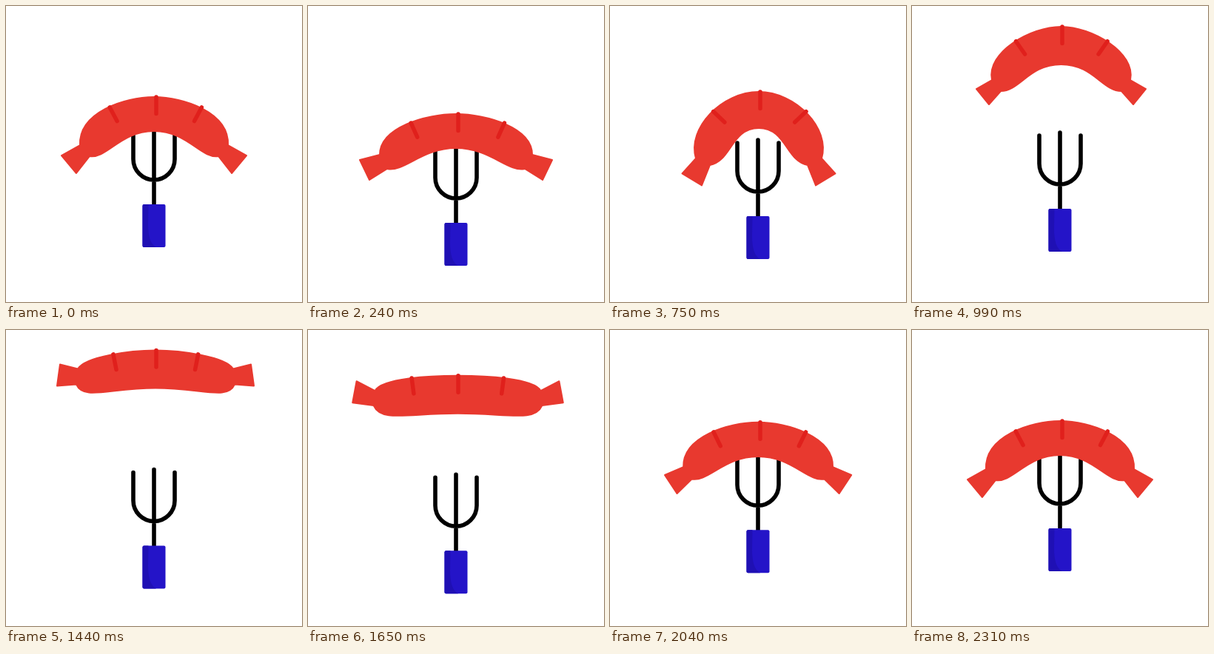
Recreate the animation shown at these times as an HTML page. Size 400x400 px, loop 5.34 s.

```html
<!DOCTYPE html>
<html lang="en">
<head>
<meta charset="utf-8">
<title>Sausage toss</title>
<style>
html, body { margin: 0; width: 100%; height: 100%; overflow: hidden; background: #fff; }
svg { display: block; width: 100%; height: 100%; }
</style>
</head>
<body>
<svg viewBox="0 0 400 400">
  <g id="fork">
    <path d="M172 169V207a28 28 0 0 0 56 0V169M200 165V270" fill="none" stroke="#000" stroke-width="5.6" stroke-linecap="round"/>
    <rect x="184.5" y="268" width="31" height="58" rx="2" fill="#2414c8"/>
    <path d="M192.500 268H186.500a2 2 0 0 0-2 2V324a2 2 0 0 0 2 2H203C195 322 192 310 192 295Z" fill="#1f10b4"/>
  </g>
  <path id="body" fill="#e8392f" stroke="#e8392f" stroke-width="2" stroke-linejoin="round"/>
  <path id="cuts" fill="none" stroke="#e0201c" stroke-width="5.5" stroke-linecap="round"/>
</svg>
<script>
const LOOP = 5340, STEP = 30;
const $ = id => document.getElementById(id);
const mix = (a, b, k) => a.map((v, i) => v + (b[i] - v) * k);

// Right half of the sausage, relative to its top centre:
// upper curve (c1x, c2, end), tab corners, lower curve (start, d1, d2x, height)
const rest   = [40, 102, 20.5, 100, 65, 125, 79, 105, 103, 87, 80, 64, 84, 45, 46];
const loose  = [41, 103, 18, 103, 55, 130, 62, 117, 89, 93, 74, 70, 79, 46, 46];
const curled = [50, 97, 49, 85, 90, 103.5, 110.5, 77, 126.5, 66, 99, 37, 94, 37, 49];
const rising = [41.5, 101.5, 35, 93.5, 72, 114.5, 84, 97.5, 105, 81.5, 87, 55.5, 87, 43.5, 51];
const flat   = [33, 95, 8, 105, 25, 129, 19, 133, 48, 107, 46, 97, 68, 63, 51];
const wide   = [36, 103, 3, 112, 20, 137, 7, 142.5, 36, 114, 40, 104, 63, 68, 51];
const landed = [41, 100, 17, 102, 50, 126, 54, 117, 80, 95, 67, 76, 72, 48, 47];

// [time, sausage top, handle top, centre x, ...shape]
const keys = [
  [0, 123, 268, 200, ...rest],
  [240, 146, 293, 200, ...loose],
  [480, 170.5, 317.5, 200, ...mix(rest, loose, 0.2)],
  [510, 171, 318, 200, ...rest],
  [750, 116, 284, 201, ...curled],
  [990, 28, 274, 201.5, ...rising],
  [1215, 18.5, 281, 201.8, ...mix(rising, flat, 0.45)],
  [1440, 27.5, 291.5, 202, ...flat],
  [1640, 59, 298.5, 202.5, ...wide],
  [1800, 131, 279, 201, ...landed],
  [1880, 133, 279, 200.5, ...mix(landed, rest, 0.5)],
  [2160, 119.5, 264.5, 200, ...mix(rest, loose, 0.3)],
  [2310, 123, 268, 200, ...rest]
];

// Smooth interpolation that never overshoots the keys
function slope(k, i) {
  if (k < 1 || k >= keys.length - 1) return 0;
  const rate = j => (keys[j + 1][i] - keys[j][i]) / (keys[j + 1][0] - keys[j][0]);
  const a = rate(k - 1), b = rate(k);
  return a * b > 0 ? 2 * a * b / (a + b) : 0;
}

function stateAt(t) {
  const last = keys[keys.length - 1];
  if (t >= last[0]) return last.slice(1);
  const k = keys.findIndex(key => key[0] > t) - 1;
  const a = keys[k], b = keys[k + 1], d = b[0] - a[0], u = (t - a[0]) / d;
  const s = u * u * (3 - 2 * u);
  return a.map((v, i) => v + (b[i] - v) * s
    + d * u * (1 - u) * ((1 - u) * slope(k, i) - u * slope(k + 1, i))).slice(1);
}

function draw(t) {
  const [y, handle, cx, c1x, c2x, c2y, ex, ey, ax, ay, bx, by, sx, sy, d1x, d1y, d2x, h] = stateAt(t);
  const at = side => (px, py) => `${(cx + side * px).toFixed(2)} ${(y + py).toFixed(2)} `;
  const R = at(1), L = at(-1);
  $('fork').setAttribute('transform', `translate(0 ${handle - 268})`);
  $('body').setAttribute('d',
    'M' + R(0, 0) + 'C' + R(c1x, 0) + R(c2x, c2y) + R(ex, ey) +
    'L' + R(ax, ay) + R(bx, by) + R(sx, sy) +
    'C' + R(d1x, d1y) + R(d2x, h) + R(0, h) +
    'C' + L(d2x, h) + L(d1x, d1y) + L(sx, sy) +
    'L' + L(bx, by) + L(ax, ay) + L(ex, ey) +
    'C' + L(c2x, c2y) + L(c1x, 0) + L(0, 0) + 'Z');

  // Side cuts stand square to the upper curve
  const u = 0.47, v = 1 - u;
  const mx = 3 * v * v * u * c1x + 3 * v * u * u * c2x + u ** 3 * ex;
  const my = 3 * v * u * u * c2y + u ** 3 * ey;
  const tx = ex + c2x - c1x, ty = ey + c2y, n = 21 / Math.hypot(tx, ty);
  const cut = side => `M${202.3 + side * mx} ${y + my}l${-side * ty * n} ${tx * n}`;
  $('cuts').setAttribute('d', `M203 ${y}v22.500` + cut(1) + cut(-1));
}

const start = performance.now();
function frame(now) {
  const t = Math.max(0, now - start) % LOOP;
  draw(Math.floor(t / STEP) * STEP);
  requestAnimationFrame(frame);
}
draw(0);
requestAnimationFrame(frame);
</script>
</body>
</html>
```
